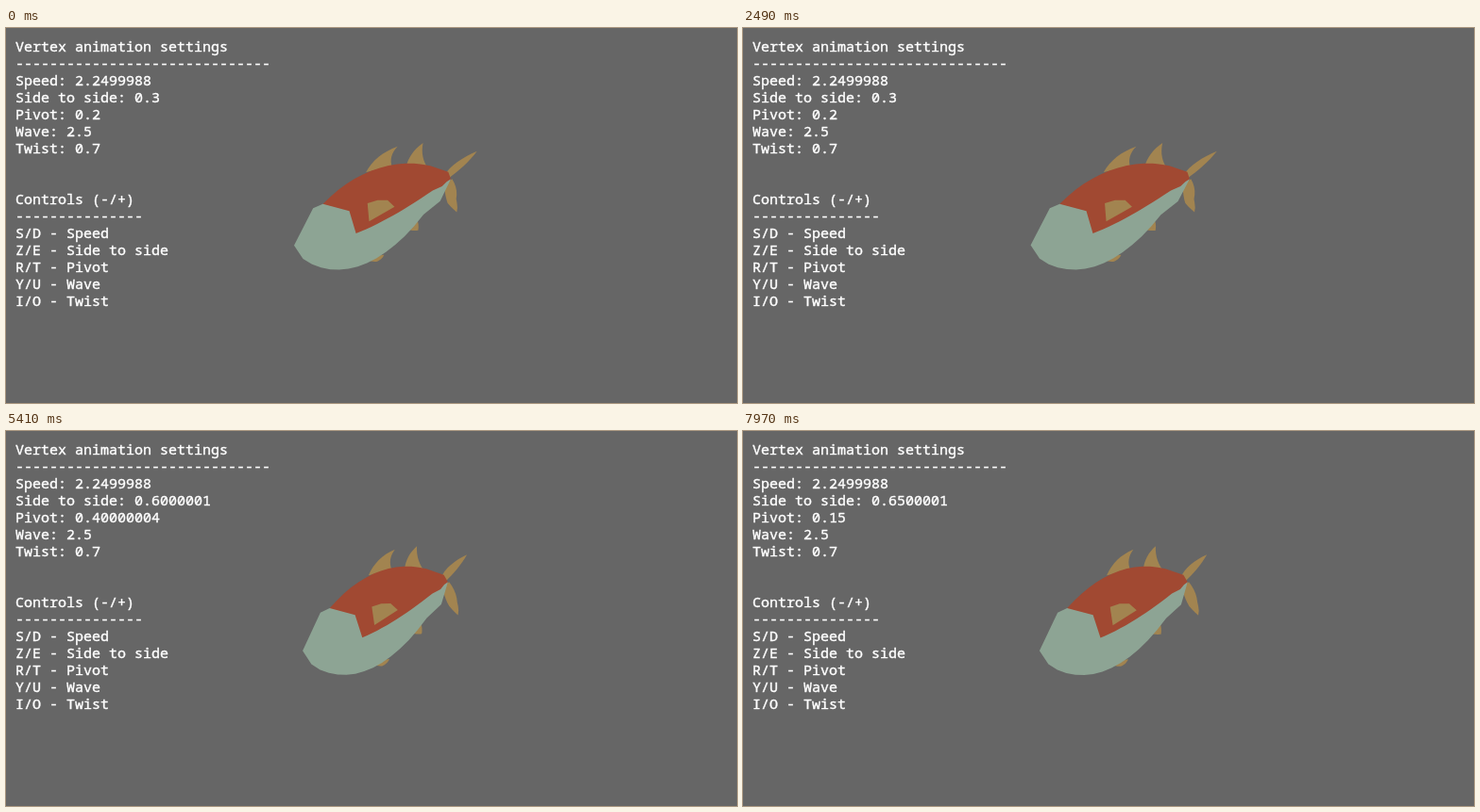
An HTML page with a canvas that plays this animation: 774 px wide and 398 px high, repeating every 8 s.

```html
<!DOCTYPE html>
<html lang="en">
<head>
<meta charset="utf-8">
<title>Vertex animation settings</title>
<style>
  html, body { margin: 0; width: 100%; height: 100%; overflow: hidden; background: #666; }
  canvas { position: absolute; left: 0; top: 0; }
  pre {
    position: absolute; left: 10px; top: 10px; margin: 0; color: #fff;
    font: 500 15px/18px "Noto Sans Mono", "DejaVu Sans Mono", monospace;
    font-variant-ligatures: none;
    -webkit-text-stroke: 0.4px #fff;
  }
</style>
</head>
<body>
<canvas id="stage" width="774" height="398"></canvas>
<pre id="panel"></pre>
<script>
const LOOP = 8000, SWIM = 2.457, KEY_REPEAT = 15.3;
const TEAL = '#8da494', RED = '#a14932', GOLD = '#a28450';
const ctx = document.getElementById('stage').getContext('2d');
const panel = document.getElementById('panel');

// Held keys: [start ms, number of 0.05 steps]
const sideKeys = [[4240, 6], [5600, -6], [6705, 7]];
const pivotKeys = [[2900, -5], [4860, 9], [7510, -5]];

// Body coordinates: u runs from nose (0) to tail joint (1), h is the height above that axis
const axisY = u => 227 - 67 * u;
const at = (u, h) => [292 + 156 * u, axisY(u) - h];
const back = u => at(u, 43 * Math.sin(Math.PI * u) ** 0.75);
const belly = u => at(u, -53 * Math.sin(Math.PI * u) ** 0.65);
const flank = u => at(u, 68 * (u - 0.48) ** 2 - 17);

function sample(curve, from, to, steps = 16) {
  return Array.from({ length: steps + 1 }, (_, i) => curve(from + (to - from) * i / steps));
}

// A fin rises from root to tip and returns to end; both edges bow sideways
function fin(root, tip, end, returnBow) {
  const edge = ([x0, y0], [x1, y1], bow) => sample(k => {
    const bulge = bow * 2 * k * (1 - k);
    return [x0 + (x1 - x0) * k + (y1 - y0) * bulge, y0 + (y1 - y0) * k - (x1 - x0) * bulge];
  }, 0, 1, 8);
  return [...edge(root, tip, 0.2), ...edge(tip, end, returnBow)];
}

const crown = at(0.135, 29), gill = at(0.372, 10);
const parts = [
  [GOLD, fin([437, 156], [455, 133], [445, 160], 0.15)],
  [GOLD, fin([449, 160], [456, 194], [441, 165], 0.2)],
  [GOLD, fin([365, 152], [392, 126], [389, 147], -0.28)],
  [GOLD, fin([402, 147], [414, 123], [424, 150], -0.2)],
  [GOLD, fin([420, 198], [423, 213], [412, 212], 0.1)],
  [GOLD, fin([388, 238], [380, 245], [366, 240], 0.2)],
  [TEAL, [...sample(belly, 0, 1), back(0.2), crown]],
  [RED, [...sample(back, 0.2, 1), ...sample(flank, 0.97, 0.423), gill]],
  [GOLD, [[368, 184], [378, 181], [388, 181], [396, 188], [371, 203]]],
];

const rest = { phase: 1.498, side: 0.3, pivot: -0.05 };

// Single-precision value after every key step up to time t
function setting(value, keys, t) {
  value = Math.fround(value);
  for (const [start, count] of keys) {
    if (t < start) break;
    const done = Math.min(Math.abs(count), Math.floor((t - start) / KEY_REPEAT) + 1);
    for (let i = 0; i < done; i++) value = Math.fround(value + Math.sign(count) * Math.fround(0.05));
  }
  return value;
}

// Shortest decimal that reads back as the same single-precision number
function show(value) {
  let digits = 1;
  while (Math.fround(value.toFixed(digits)) !== value && digits < 20) digits++;
  return value.toFixed(digits);
}

// Sway and pivot follow the stroke; wave and twist lead it, growing towards the tail
function sway(u, h, tip, { phase, side, pivot }) {
  const reach = 1 - 0.12 * u - 0.0022 * Math.max(h, 0) + 0.15 * tip;
  const wave = 1 + (13 + 0.31 * Math.max(h, -25)) * u * u + 2 * tip;
  return reach * (38 * side + 8 * pivot * (1 - 2 * u)) * Math.cos(phase)
    + wave * Math.cos(phase + 1.7 - 0.45 * tip);
}

function place([x, y], pose) {
  const u = (x - 292) / 156, h = axisY(u) - y;
  const tip = u > 0.93 ? Math.min(1, Math.hypot(x - 447, y - 160) / 30) : 0;
  const dx = sway(u, h, tip, pose) - sway(u, h, tip, rest);
  return [x + dx, y + dx * (0.28 - 0.27 * u - 0.002 * h)];
}

function drawFish(pose) {
  ctx.clearRect(0, 0, 774, 398);
  for (const [color, points] of parts) {
    ctx.beginPath();
    for (const point of points) ctx.lineTo(...place(point, pose));
    ctx.fillStyle = color;
    ctx.fill();
  }
}

function panelText(side, pivot) {
  return `Vertex animation settings
${'-'.repeat(30)}
Speed: 2.2499988
Side to side: ${show(side)}
Pivot: ${show(pivot)}
Wave: 2.5
Twist: 0.7


Controls (-/+)
${'-'.repeat(15)}
S/D - Speed
Z/E - Side to side
R/T - Pivot
Y/U - Wave
I/O - Twist`;
}

const began = performance.now();
function frame() {
  const t = (performance.now() - began) % LOOP;
  const side = setting(0.3, sideKeys, t);
  const pivot = setting(0.2, pivotKeys, t);
  drawFish({ phase: SWIM * (t / 1000 - 0.083), side, pivot });
  const text = panelText(side, pivot);
  if (panel.textContent !== text) panel.textContent = text;
  requestAnimationFrame(frame);
}
frame();
</script>
</body>
</html>
```
